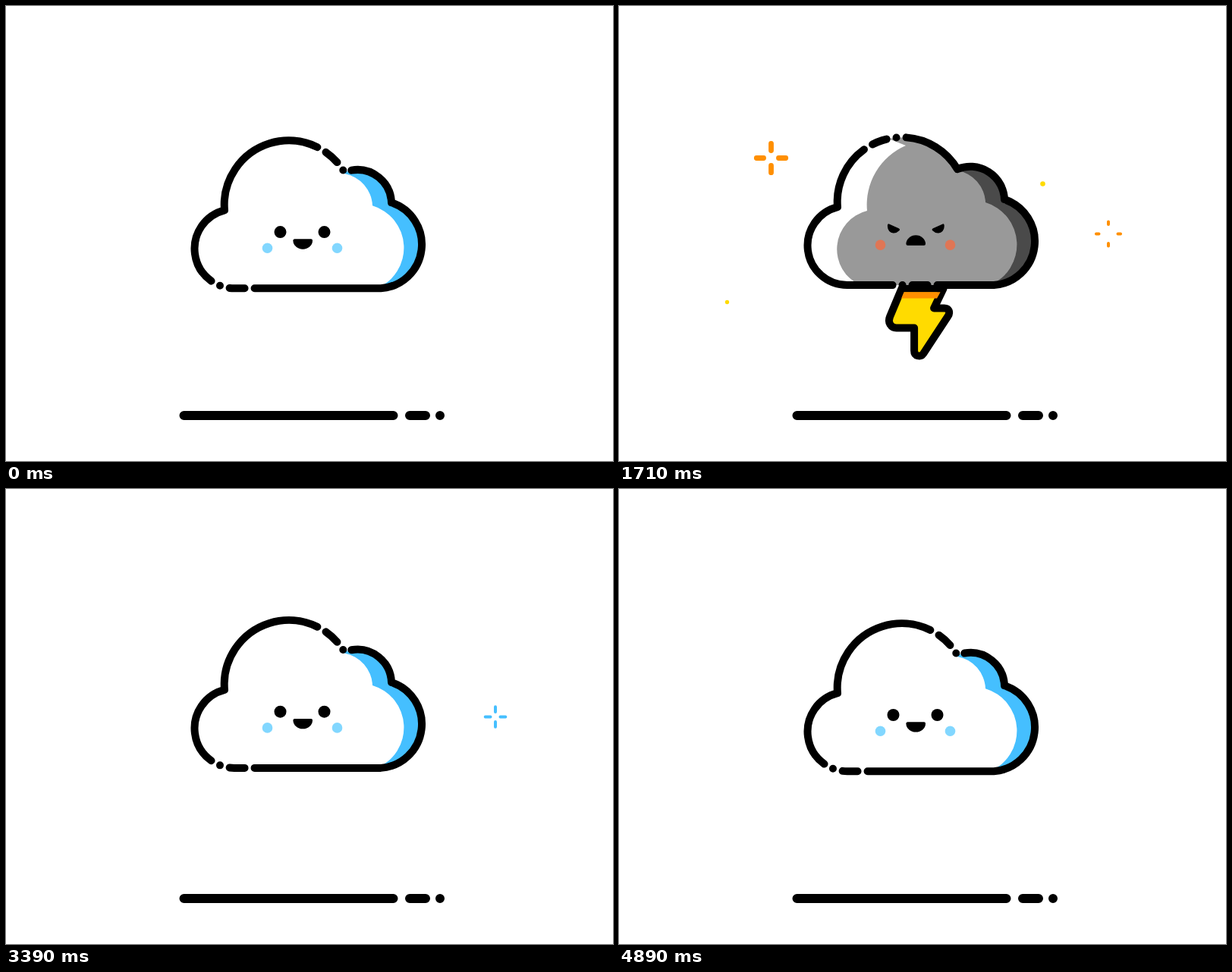
Animation of 800x600 px, one loop 4920 ms. Source, as an HTML page:

```html
<!DOCTYPE html>
<html lang="en">
<head>
<meta charset="utf-8">
<title>Moody cloud</title>
<style>
html, body { margin: 0; width: 100%; height: 100%; overflow: hidden; background: #fff; }
svg { display: block; width: 100%; height: 100%; }
.line { fill: none; stroke: #000; stroke-linecap: round; stroke-linejoin: round; }
</style>
</head>
<body>
<svg viewBox="0 0 800 600">
  <defs>
    <path id="outline" d="M288 269A85 85 0 0 1 446 219A45 45 0 0 1 508 259A58 58 0 0 1 494 372H301A52.3 52.3 0 0 1 288 269Z"/>
    <clipPath id="inside"><use href="#outline"/></clipPath>
    <clipPath id="below"><rect x="300" y="370" width="200" height="150"/></clipPath>
    <path id="frown" d="M356 291.3L368.8 297.2Q371 298.5 369.3 300.2Q366 303.6 361.5 303.4A8 8 0 0 1 354 295.5Q353.4 290.6 356 291.3Z"/>
  </defs>

  <path class="line" stroke-width="12" d="M234.5 540H510.5M532 540H553M572 540h0.01"/>
  <g id="effects"></g>

  <g id="cloud">
    <g clip-path="url(#below)">
      <g id="bolt">
        <path fill="#ffdb00" stroke="#000" stroke-width="10" stroke-linejoin="round"
          d="M375 376.4L359.5 413.4C356 421.4 361 428.4 368 428.4H391.5V458.4C391.5 466 400 467.4 403.5 462.4L436 412.9C439.5 407.4 437 402.4 431 402.4H417.5L430 376.4Z"/>
        <path fill="#ff8f00" d="M378 381.2H426L421.5 389.4H374.5Z"/>
      </g>
    </g>
    <use href="#outline" fill="#fff"/>
    <g clip-path="url(#inside)">
      <use id="body" href="#outline"/>
      <path fill="#fff" d="M378 188A85 85 0 0 0 327 274A52 52 0 0 0 318 372H230V170H333Z"/>
      <path id="shade" d="M446 220.7A45 45 0 0 1 483 263A58 58 0 0 1 489 372H570V200H446Z"/>
    </g>
    <use id="edge" class="line" href="#outline" stroke-width="10"
      stroke-dasharray="20 13 0 13 402.8 13 20 13 0 13 299 13"/>
    <g id="cheeks">
      <circle cx="344.5" cy="319"/><circle cx="436.5" cy="319"/>
    </g>
    <g id="calmEyes">
      <circle cx="361.5" cy="297.8" r="8"/><circle cx="419.5" cy="297.8" r="8"/>
    </g>
    <g id="angryEyes">
      <use href="#frown"/><use href="#frown" transform="matrix(-1 0 0 1 782.6 0)"/>
    </g>
    <path id="mouth" d="M378.4 309Q378.4 307 380.4 307H402Q404 307 404 309A12.8 11.4 0 0 1 378.4 309Z"/>
  </g>
</svg>

<script>
const LOOP = 4920, BOBS = 5, BOB_PEAK = 0.62;
const SPARK_LIFE = 480, DOT_LIFE = 400;
const STORM = ["#ff8f00", "#ffdb00"], SUNNY = ["#45bfff", "#c9edff"];

// x, y, radius, start in the storm, start in the calm
const sparks = [
  [568.5, 116, 47.5, 638, 4150],
  [330, 100, 47, 1150, 3925],
  [645, 300.5, 20, 1278, 3024],
  [200.5, 200.5, 47, 1480, 3432],
  [182, 146, 47, 1826, 4400]
];
// x, y, peak in the storm, peak in the calm
const dots = [
  [219, 110, 1180, 4560],
  [454.5, 78, 1350, 3980],
  [142.5, 390.5, 1593, 4180],
  [558.5, 234.5, 1810, 3600],
  [662.5, 390.5, 2168, 3760]
];

const $ = id => document.getElementById(id);
const clamp = v => Math.min(1, Math.max(0, v));
const ramp = (t, from, to) => clamp((t - from) / (to - from));
const easeOut = v => 1 - (1 - v) ** 1.43;
const smooth = v => (1 - Math.cos(Math.PI * v)) / 2;
const mix = (a, b, k) => `rgb(${a.map((v, i) => Math.round(v + (b[i] - v) * k))})`;
const scaleAt = (x, y, sx, sy) => `translate(${x} ${y}) scale(${sx} ${sy}) translate(${-x} ${-y})`;

function spark(x, y, radius, u, color) {
  if (u <= 0 || u >= 1) return "";
  const width = 0.3 * radius * Math.min(u, 0.66);
  const outer = radius * u - width / 2;
  const trim = 11.4 * Math.max(0, u - 0.75) ** 2;
  const inner = Math.min(outer - 0.01, radius * (0.29 * u + trim) + width / 2);
  const arms = [[1, 0], [-1, 0], [0, 1], [0, -1]].map(([dx, dy]) =>
    `M${x + dx * inner} ${y + dy * inner}L${x + dx * outer} ${y + dy * outer}`).join("");
  return `<path d="${arms}" stroke="${color}" stroke-width="${width}" stroke-linecap="round"/>`;
}

function dot(x, y, age, color) {
  const r = 6.5 * (1 - Math.abs(age) / (DOT_LIFE / 2));
  return r > 0 ? `<circle cx="${x}" cy="${y}" r="${r}" fill="${color}"/>` : "";
}

function drawEffects(t) {
  let out = "";
  [STORM, SUNNY].forEach(([sparkColor, dotColor], mood) => {
    for (const [x, y, r, ...starts] of sparks)
      out += spark(x, y, r, (t - starts[mood]) / SPARK_LIFE, sparkColor);
    for (const [x, y, ...peaks] of dots)
      out += dot(x, y, t - peaks[mood], dotColor);
  });
  $("effects").innerHTML = out;
}

function draw(t) {
  const phase = t * BOBS / LOOP % 1;
  const lift = smooth(phase < BOB_PEAK ? phase / BOB_PEAK : (1 - phase) / (1 - BOB_PEAK));
  $("cloud").setAttribute("transform", `translate(0 ${0.3 - 5.4 * lift})`);

  const toStorm = ramp(t, 540, 840), toCalm = ramp(t, 2750, 3130);
  const tint = toStorm - toCalm;
  const anger = easeOut(toStorm) - easeOut(toCalm);
  $("body").setAttribute("fill", mix([241, 249, 253], [153, 153, 153], tint));
  $("body").setAttribute("opacity", clamp(tint * 2));
  $("shade").setAttribute("fill", mix([69, 191, 255], [74, 74, 74], tint));
  $("edge").setAttribute("stroke-dashoffset", 92 * anger - 192.2);

  // The face squashes while it swaps expression.
  const angry = anger > 0.5, open = Math.abs(2 * anger - 1);
  const eyes = scaleAt(391, 297.8, 1, Math.max(0.1, open));
  $("calmEyes").setAttribute("transform", eyes);
  $("angryEyes").setAttribute("transform", eyes);
  $("calmEyes").setAttribute("display", angry ? "none" : "inline");
  $("angryEyes").setAttribute("display", angry ? "inline" : "none");
  $("mouth").setAttribute("transform",
    scaleAt(391.2, 313.3, 1.08 - 0.08 * open, (0.7 + 0.3 * open) * (angry ? -1 : 1)));
  $("cheeks").setAttribute("fill", angry ? "#e07655" : "#82d7ff");
  for (const cheek of $("cheeks").children) cheek.setAttribute("r", 6.8 * (0.68 + 0.32 * open));

  const drop = smooth(ramp(t, 640, 880)) - smooth(ramp(t, 2710, 2890));
  $("bolt").setAttribute("transform", `translate(${-3.1 * lift} ${-105 * (1 - drop)})`);
  $("bolt").setAttribute("display", drop > 0 ? "inline" : "none");

  drawEffects(t);
}

const start = performance.now();
function frame() {
  draw((performance.now() - start) % LOOP);
  requestAnimationFrame(frame);
}
frame();
</script>
</body>
</html>
```
